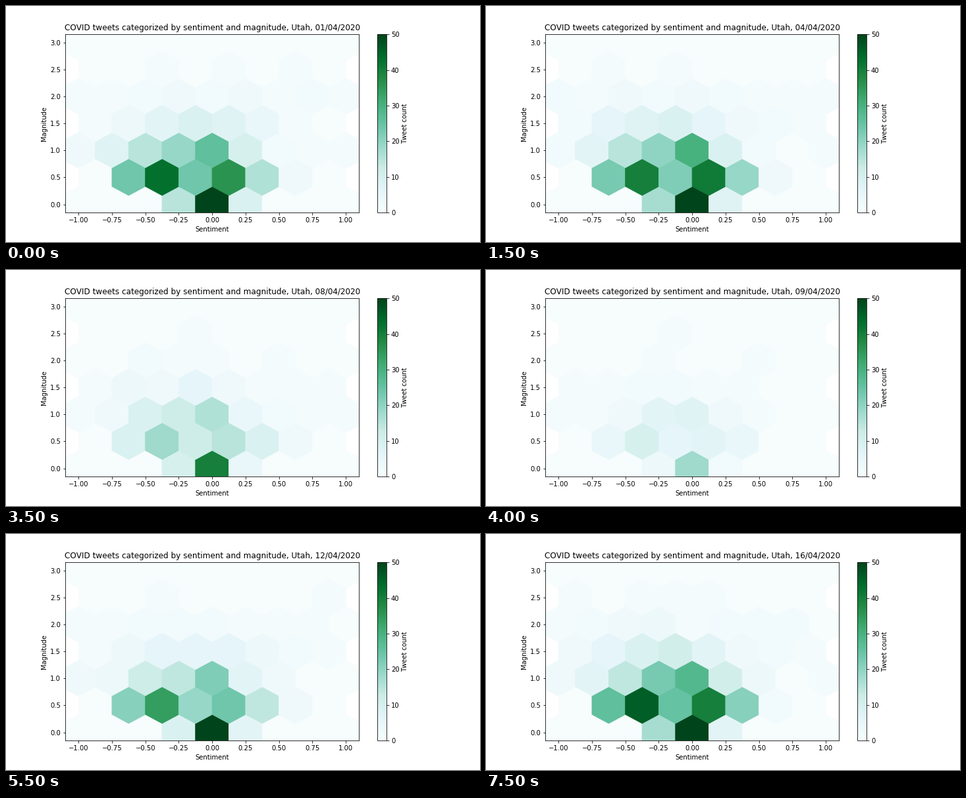
These frames come from a looping animation (720 by 360 pixels, 8 s). A matplotlib script:

```python
import numpy as np
import matplotlib.pyplot as plt
from matplotlib.animation import FuncAnimation

DAYS = 16
TITLE = "COVID tweets categorized by sentiment and magnitude, Utah, {:02d}/04/2020"

# Cells that stand out: sentiment, magnitude, extra tweets
PEAKS = [(0, 0, 60), (-0.625, 0.5, 9), (-0.375, 0.5, 19),
         (0.125, 0.5, 16), (0.375, 0.5, 9), (0, 1, 9)]


def bump(x, y, x0, y0, wx, wy):
    return np.exp(-((x - x0) / wx) ** 2 - ((y - y0) / wy) ** 2)


def activity(day):
    """Overall traffic, with a quiet spell in the middle of the period."""
    return np.interp(day, [1, 6, 9, 10, 12, 14, 16], [1.1, 1.1, 0.27, 0.27, 0.8, 0.95, 1.15])


def typical_counts(x, y):
    """Average day: a broad hill inside a wedge, faint haze above, sharp peaks."""
    hill = 22 * bump(x, y, -0.2, 0.55, 0.55, 0.9)
    wedge = np.abs(x) < 0.3 + 0.8 * y
    haze = 1.4 * bump(x, y, 0, 1.7, 1.1, 0.7)
    peaks = sum(h * bump(x, y, x0, y0, 0.1, 0.2) for x0, y0, h in PEAKS)
    return hill * wedge + haze + peaks


def day_counts(day, x, y):
    mean = activity(day) * typical_counts(x, y)
    noise = np.random.default_rng(day).normal(0, 0.5, mean.size)
    return np.rint(np.maximum(mean + noise * np.sqrt(mean), 0))


# One point in the middle of every visible cell
centres = [(-1 + 0.25 * i, j) for i in range(9) for j in range(4)]
centres += [(-0.875 + 0.25 * i, j + 0.5) for i in range(8) for j in range(3)]
px, py = np.array(centres).T

plt.rcParams["text.kerning_factor"] = 6
fig, ax = plt.subplots(figsize=(10, 5), dpi=72)
fig.subplots_adjust(left=0.125, right=0.9, bottom=0.125, top=0.88)
hexes = ax.hexbin(px, py, C=np.zeros(len(px)), gridsize=(8, 4), extent=(-1, 1, 0, 4),
                  cmap="BuGn", vmin=0, vmax=50)
ax.set(xlim=(-1.1, 1.1), ylim=(-0.15, 3.15), xlabel="Sentiment", ylabel="Magnitude",
       xticks=np.arange(-1, 1.01, 0.25), yticks=np.arange(0, 3.01, 0.5))
title = ax.set_title(TITLE.format(1))
fig.colorbar(hexes, ax=ax, label="Tweet count", ticks=range(0, 51, 10))

cx, cy = np.asarray(hexes.get_offsets()).T


def draw(i):
    hexes.set_array(day_counts(i + 1, cx, cy))
    title.set_text(TITLE.format(i + 1))
    return hexes, title


anim = FuncAnimation(fig, draw, frames=DAYS, init_func=lambda: draw(0),
                     interval=500, repeat=True, repeat_delay=0, blit=False)
plt.show()
```
